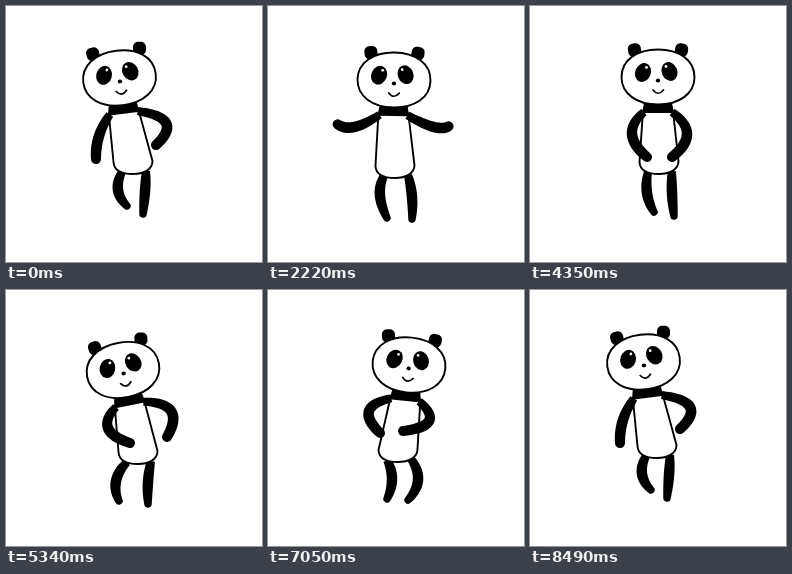
Animation of 256x256 px, one loop 8520 ms. Source, as an HTML page:

```html
<!DOCTYPE html>
<html lang="en">
<head>
<meta charset="utf-8">
<title>Dancing panda</title>
<style>
  html, body { margin: 0; width: 100%; height: 100%; overflow: hidden; background: #fff; }
  svg { display: block; width: 100%; height: 100%; }
  .line { fill: #fff; stroke: #000; stroke-width: 1.9; stroke-linejoin: round; }
</style>
</head>
<body>
<svg viewBox="0 0 256 256">
  <path id="legL"/><path id="legR"/>
  <path id="torso" class="line"/>
  <path id="collar"/>
  <path id="armL"/><path id="armR"/>
  <g id="head">
    <rect x="-30" y="-33.5" width="13" height="13" rx="5" transform="rotate(-8 -23.5 -27)"/>
    <rect x="17" y="-33.5" width="13" height="13" rx="5" transform="rotate(8 23.5 -27)"/>
    <path class="line" d="M-36.5 0C-36.5-17-21-27.5 0-27.5S36.5-17 36.5 0 21 27.5 0 27.5-36.5 17-36.5 0Z"/>
    <ellipse cx="-15" cy="-4.5" rx="7.8" ry="9.6" transform="rotate(22 -15 -4.5)"/>
    <ellipse cx="11.5" cy="-5.5" rx="7.8" ry="9.6" transform="rotate(-22 11.5 -5.5)"/>
    <circle cx="-11.5" cy="-9.5" r="1.4" fill="#fff"/>
    <circle cx="8" cy="-10.5" r="1.4" fill="#fff"/>
    <ellipse cy="3.5" rx="2.2" ry="1.9"/>
    <path d="M-5 13Q0 19.5 5.5 13" fill="none" stroke="#000" stroke-width="1.7" stroke-linecap="round"/>
  </g>
</svg>
<script>
const LOOP = 8520, STEP = 30, LAST = LOOP - STEP;

// time, head x, head y, tilt, hip x, hip y
const bodyKeys = [
  [0, 113.5, 72, -7, 127, 159],
  [690, 119, 73, -4, 127, 161],
  [1380, 124.5, 77, -1.5, 128, 164],
  [2200, 126, 74, 1, 127, 163],
  [3030, 124.5, 77, -1, 126, 165],
  [4350, 128, 71, 0, 129, 159],
  [4800, 119, 63, -5, 129, 158],
  [5340, 117, 80, -11, 132, 165],
  [6200, 128, 75, 0, 130, 163],
  [7050, 141, 75, 6, 130, 163],
  [7500, 135, 73, 3, 129, 162],
  [8100, 120, 64, -3, 127, 158]
];

// time, left elbow, left hand, right elbow, right hand
const armKeys = [
  [0, 93, 130, 90, 153, 160, 117, 150, 139],
  [690, 84, 132, 93, 152, 164, 124, 154, 146],
  [1380, 90, 126, 104, 153, 157, 129, 146, 153],
  [2200, 87, 121, 70, 119, 165, 121, 180, 121],
  [2640, 85, 118, 67, 103, 170, 117, 191, 106],
  [3030, 86, 116, 77, 97, 167, 113, 163, 90],
  [3700, 89, 123, 92, 132, 165, 124, 162, 132],
  [4350, 102, 128, 117, 151, 157, 128, 142, 151],
  [4800, 86, 125, 76, 139, 156, 122, 154, 142],
  [5340, 102, 138, 124, 153, 165, 121, 161, 147],
  [6200, 92, 128, 92, 148, 164, 123, 160, 143],
  [6540, 89, 125, 76, 137, 170, 124, 180, 136],
  [7050, 101, 121, 112, 143, 161, 131, 135, 141],
  [7500, 95, 126, 94, 149, 165, 126, 162, 144]
];

// time, left knee, left foot, right knee, right foot
const legKeys = [
  [0, 112, 184, 121, 200, 139, 185, 137, 208],
  [690, 110, 186, 119, 208, 142, 188, 141, 213],
  [1380, 112, 193, 124, 211, 145, 193, 142, 213],
  [2200, 112, 189, 119, 212, 144, 190, 144, 213],
  [3030, 107, 187, 121, 207, 136, 193, 143, 212],
  [4350, 117, 187, 124, 206, 142, 187, 144, 210],
  [5340, 110, 191, 113, 211, 142, 192, 142, 214],
  [6200, 113, 189, 118, 210, 146, 191, 142, 213],
  [7050, 124, 189, 119, 209, 150, 190, 140, 210],
  [8000, 114, 186, 121, 210, 142, 187, 140, 214]
];

// Periodic cubic interpolation through the poses.
function sample(keys, t) {
  const n = keys.length;
  const key = i => {
    const lap = Math.floor(i / n), k = keys[i - lap * n];
    return [k[0] + lap * LAST, ...k.slice(1)];
  };
  let i = n - 1;
  while (keys[i][0] > t) i--;
  const [a, b, c, d] = [key(i - 1), key(i), key(i + 1), key(i + 2)];
  const span = c[0] - b[0], u = (t - b[0]) / span, v = 1 - u;
  return b.slice(1).map((p, j) => {
    const q = c[j + 1];
    const m0 = (q - a[j + 1]) / (c[0] - a[0]) * span;
    const m1 = (d[j + 1] - p) / (d[0] - b[0]) * span;
    return p * (1 + 2 * u) * v * v + m0 * u * v * v + q * u * u * (3 - 2 * u) - m1 * u * u * v;
  });
}

const el = id => document.getElementById(id);
const setPath = (id, d) => el(id).setAttribute("d", d);
const fmt = pts => pts.map(p => p.map(n => n.toFixed(2)).join(" ")).join("L");

// A bent limb with a width at its start, middle and end.
function limb([ax, ay], [mx, my], [ex, ey], [w0, w1, w2]) {
  const cx = 2 * mx - (ax + ex) / 2, cy = 2 * my - (ay + ey) / 2;
  const left = [], right = [];
  for (let i = 0; i <= 20; i++) {
    const u = i / 20, v = 1 - u;
    const x = v * v * ax + 2 * u * v * cx + u * u * ex;
    const y = v * v * ay + 2 * u * v * cy + u * u * ey;
    const dx = v * (cx - ax) + u * (ex - cx), dy = v * (cy - ay) + u * (ey - cy);
    const len = Math.hypot(dx, dy) || 1;
    const r = (w0 * v * (1 - 2 * u) + 4 * w1 * u * v + w2 * u * (2 * u - 1)) / 2;
    left.push([x - dy / len * r, y + dx / len * r]);
    right.unshift([x + dy / len * r, y - dx / len * r]);
  }
  const cap = w2 / 2;
  return `M${fmt(left)}A${cap} ${cap} 0 0 0 ${fmt(right)}Z`;
}

function draw(t) {
  const [x, y, tilt, hx, hy] = sample(bodyKeys, t);
  const arms = sample(armKeys, t), legs = sample(legKeys, t);
  const rad = tilt * Math.PI / 180, cos = Math.cos(rad), sin = Math.sin(rad);
  const fromHead = (px, py) => [x + px * cos - py * sin, y + px * sin + py * cos];
  const at = (list, i) => [list[i], list[i + 1]];

  el("head").setAttribute("transform", `translate(${x} ${y}) rotate(${tilt})`);
  setPath("collar", `M${fmt([fromHead(-14, 26), fromHead(14, 26), fromHead(16, 36), fromHead(-16, 36)])}Z`);

  const tl = fromHead(-15, 34), tr = fromHead(15, 34);
  setPath("torso", `M${fmt([tl, [hx - 19.5, hy - 3]])}C${hx - 19} ${hy + 6} ${hx - 10} ${hy + 9} ${hx} ${hy + 9}` +
    `S${hx + 19.5} ${hy + 5} ${hx + 19.5} ${hy - 4}L${fmt([tr])}Z`);

  const armWidths = [8, 10.5, 10], legWidths = [8, 10.5, 7.5];
  setPath("armL", limb(fromHead(-14, 35), at(arms, 0), at(arms, 2), armWidths));
  setPath("armR", limb(fromHead(14, 35), at(arms, 4), at(arms, 6), armWidths));
  setPath("legL", limb([hx - 11, hy + 7], at(legs, 0), at(legs, 2), legWidths));
  setPath("legR", limb([hx + 13, hy + 6], at(legs, 4), at(legs, 6), legWidths));
}

const start = performance.now();
function tick() {
  const t = (performance.now() - start) % LOOP;
  draw(Math.floor(t / STEP) * STEP);
  requestAnimationFrame(tick);
}
tick();
</script>
</body>
</html>
```
